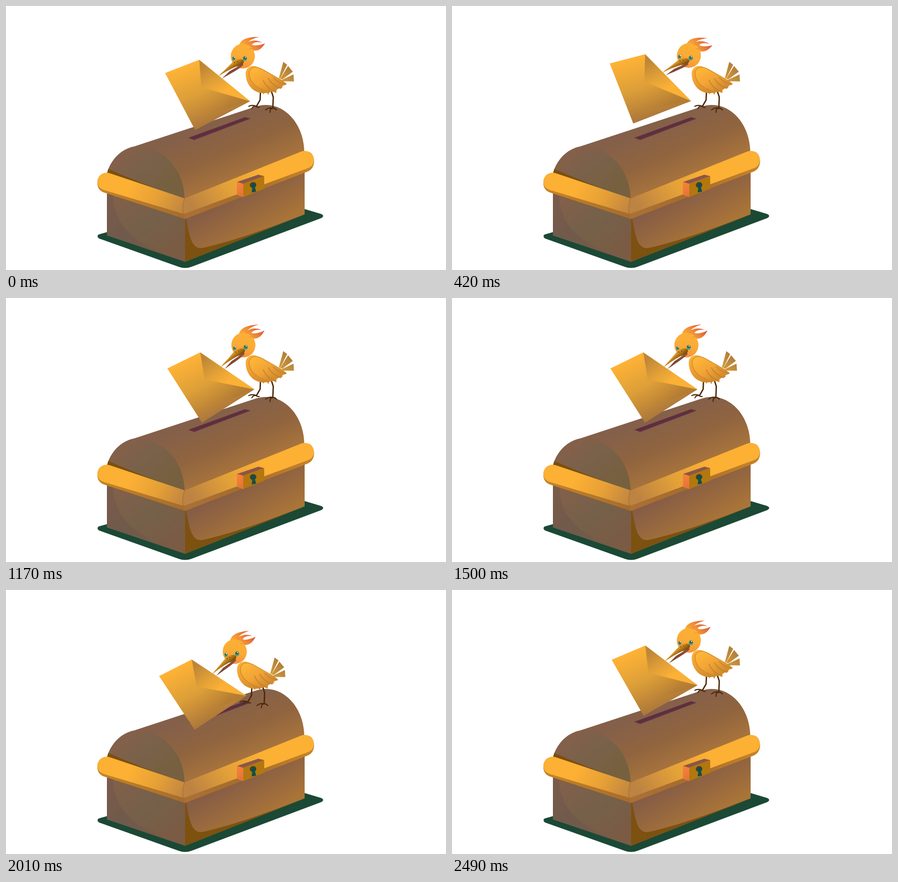
Animation, 968 px wide and 579 px high, one loop 3.3 s. Source, as an HTML page with a canvas:

```html
<!DOCTYPE html>
<html lang="en">
<head>
<meta charset="utf-8">
<title>Bird with a letter</title>
<style>
html, body { margin: 0; width: 100%; height: 100%; overflow: hidden; background: #fff; }
canvas { display: block; }
</style>
</head>
<body>
<canvas id="stage" width="968" height="579"></canvas>
<script>
const ctx = document.getElementById('stage').getContext('2d');
const LOOP = 3300, STEP = 30;
const NECK = [535, 111];

// [time, value] keys
const tilt = [[240, 0], [450, 6.8], [660, -4.8], [1800, -4.8], [1895, 6.4],
  [2010, -5.7], [2085, 6.4], [2160, -1.9]];
const moveX = [[1410, 0], [1500, -6.5], [1740, -19], [2310, -19], [2490, 0]];
const moveY = [[1140, 0], [1170, -6], [1200, -21], [1260, -21], [1290, 0], [1410, 0],
  [1500, -6], [1590, -28], [1740, 25.5], [2310, 25.5], [2430, -23], [2490, 0]];
const headLift = [[1140, 0], [1170, 1], [2310, 1], [2490, 0]];

function track(keys, t, ease = true) {
  if (t <= keys[0][0]) return keys[0][1];
  for (let i = 1; i < keys.length; i++) {
    const [t0, v0] = keys[i - 1], [t1, v1] = keys[i];
    if (t <= t1) {
      const p = (t - t0) / (t1 - t0);
      return v0 + (v1 - v0) * (ease ? p * p * (3 - 2 * p) : p);
    }
  }
  return keys[keys.length - 1][1];
}

function grad(x0, y0, x1, y1, ...colors) {
  const g = ctx.createLinearGradient(x0, y0, x1, y1);
  colors.forEach((c, i) => g.addColorStop(i / (colors.length - 1), c));
  return g;
}

function fill(d, style) {
  ctx.fillStyle = style;
  ctx.fill(new Path2D(d));
}

function line(d, color, width) {
  ctx.strokeStyle = color;
  ctx.lineWidth = width;
  ctx.lineCap = ctx.lineJoin = 'round';
  ctx.stroke(new Path2D(d));
}

function oval(x, y, rx, ry, style, turn = 0) {
  ctx.fillStyle = style;
  ctx.beginPath();
  ctx.ellipse(x, y, rx, ry, turn, 0, Math.PI * 2);
  ctx.fill();
}

function drawBase() {
  fill('M222 496L204 501Q198 505 205 510L380 572Q394 577 408 572L694 465Q702 460 693 456L656 445Z', '#1b4935');
  fill('M222 398V503L394 561V450Z', grad(240, 420, 345, 560, '#83604a', '#75604a', '#7b5b43'));
  fill('M222 398V503L394 561C300 525 236 500 235 404Z', grad(222, 420, 340, 545, '#7a5b4b', '#705a4b', '#765a48'));
  fill('M394 455L657 355V457L394 561Z', grad(480, 425, 530, 515, '#855c46', '#a97438'));
  fill('M394 455V561L657 457C590 482 500 517 430 531C404 533 402 490 394 455Z', '#7d510f');
}

function drawLid() {
  fill('M222 368C230 338 252 314 282 308L548 221C603 202 657 252 656.5 324L393 424Z',
    grad(440, 262, 495, 392, '#84604a', '#90643f', '#aa753c'));
  fill('M222 368C230 338 252 314 282 309C335 303 392 350 393 424Z',
    grad(255, 320, 330, 415, '#85604a', '#79614a', '#77603f'));
  fill('M225 357Q264 375 345 406L222 368Z', '#7b500f');
}

function drawTrim() {
  fill('M227 367C211 363 201 374 201 388C201 399 207 406 216 409L394 467L664 362C681 357 682 327 667 320L393 422Z', '#a96c2b');
  fill('M229 367C213 362 201 373 201 386C201 396 207 401 216 404L391 456L393 422Z',
    grad(280, 383, 394, 444, '#fcb034', '#e6a036', '#bf8541'));
  fill('M216 404L390 456L394 467L216 409C208 406 203 401 202 393C205 399 210 402 216 404Z',
    grad(210, 404, 394, 462, '#c68524', '#a66b2c'));
  fill('M393 422L650 319C665 314 677 324 677.5 337C677 347 673 353 664 356L392 456Q388 438 393 422Z',
    grad(558, 356, 420, 452, '#fcb034', '#e2a038', '#bd8342'));
  fill('M392 456L664 356C673 353 677 347 677.5 338C678 351 673 359 664 363L394 467Z',
    grad(394, 462, 675, 350, '#aa7035', '#a66c2a', '#c88528'));
  line('M393 422C387 437 388 456 394 466', '#a7712d', 1.3);
}

function drawSlotAndLock() {
  fill('M401 289L526 244L538 247L414 294Z', '#5c2f40');
  line('M402 289L526 244L537 247L414 293Z', '#753c42', 1);
  fill('M508 386L555 370L568 373L522 390Z', '#8c5646');
  fill('M508 386L522 390V419L508 414Z', grad(508, 390, 522, 412, '#f58238', '#e77438'));
  fill('M522 390L568 373V401L522 419Z', '#b2770f');
  oval(543.5, 392.5, 7.2, 6.3, '#4c421c', -0.2);
  oval(544.5, 393.5, 5.8, 5, '#124e49', -0.2);
  fill('M542 396L540.5 409L550.5 407L547 396Z', '#124e49');
}

function drawLegs() {
  const brown = '#4b2a0b';
  line('M560 184L559 206L551 220', brown, 3);
  line('M582 181L588 200L587 224', brown, 3);
  line('M551 220Q542 216 534 220M551 220Q543 219 541 225M550 219Q552 223 557 222', brown, 2.3);
  line('M587 224Q578 222 571 228M587 224Q580 225 581 233M587 224Q592 224 595 228', brown, 2.3);
}

function drawBody() {
  const tail = grad(602, 160, 630, 132, '#d39a3b', '#a9793a');
  fill('M600 159L610 122.5L618.5 129L604 158Z', tail);
  fill('M603 160L620.5 131.5L631 144L608 161Z', tail);
  fill('M602 165L611 160L632.5 150L633.5 165.5Z', tail);
  fill('M527.5 145C530 133 542 128 554 134C573 143 590 155 617 171L604 178C592 188 576 192 562 191C540 188 526 168 527.5 145Z',
    grad(550, 130, 562, 194, '#fbb136', '#f0a033', '#cf882c'));
  fill('M560 178L566 194L572 186L577 195L581 185L595 191L594 176Z', '#cf8a2a');
  fill('M535 142C540 130 554 132 566 140C585 151 600 158 617 171Q613 176 605 171Q612 179 604 181Q595 180 589 174Q600 188 592 187C582 187 577 180 572 176Q582 188 574 186C552 183 531 166 535 142Z',
    grad(550, 138, 585, 188, '#fdb438', '#f2a435', '#d38b2f'));
  line('M535 142C532 163 548 180 574 186', '#d08b2c', 1.6);
  line('M566 163Q572 179 591 187M577 159Q586 174 604 181M588 157Q598 168 616 172', '#c0812d', 1.7);
  line('M536 142C541 131 554 133 566 140C585 151 600 158 616 170', '#d28e2f', 1.5);
}

function drawEye(x, y, rx, ry) {
  oval(x, y, rx, ry, '#e3a646');
  oval(x, y + 0.5, rx - 0.8, ry - 0.8, grad(x, y - 4, x, y + 5, '#167360', '#35b093'));
  oval(x + 0.4, y - 1, rx * 0.46, ry * 0.46, '#4b4a2b');
  oval(x + 1.2, y - 2.2, 1.2, 1.3, '#fff');
}

function drawHead() {
  fill('M512 92C513 74 528 67 558 68C546 70 538 74 533 79C543 74 553 75 563 80C552 78 544 80 541 85C548 88 560 86 570 82C563 93 556 99 545 98L530 102Z',
    grad(524, 96, 556, 70, '#fbac36', '#f08c38', '#dc5a38'));
  oval(521, 110, 26.5, 27, grad(528, 84, 513, 138, '#fbb035', '#fbab36', '#f58f3b'));
  line('M529 86Q534 79 546 76M535 94Q544 94 553 90', '#e98537', 1);
  drawEye(501, 115, 4, 5);
  drawEye(525.5, 115, 5.3, 5.8);
  fill('M475 159L492 143C504 136 512 132 521 126L522 130C512 139 496 147 475 159Z',
    grad(480, 154, 521, 130, '#7c432e', '#8f5240'));
  fill('M466 155L498 124C506 117 519 114 523 120C525 128 514 131 506 133C492 139 478 147 466 155Z',
    grad(494, 125, 504, 138, '#dc971f', '#b57617', '#7d4d0d'));
  line('M472 149C486 137 497 127 511 120', '#e9ab36', 1);
  oval(503, 124, 1.4, 1, '#61400d', -0.6);
  oval(509, 122, 1.4, 1, '#61400d', -0.6);
}

function drawLetter() {
  fill('M350 147L425 118L537 209L416 272Z', grad(390, 134, 440, 258, '#feb236', '#dd9f38', '#ae793a'));
  fill('M430 178L537 209L425 243L395 228Z', grad(425, 180, 488, 224, 'rgba(235,164,50,0)', 'rgba(165,108,32,.25)'));
  fill('M425 118L537 209L430 178Z', grad(432, 132, 470, 192, '#bd8637', '#dd9d37', '#fbb036'));
}

function draw(t) {
  ctx.fillStyle = '#fff';
  ctx.fillRect(0, 0, 968, 579);
  drawBase();
  drawLid();
  drawTrim();
  drawSlotAndLock();

  const lift = track(headLift, t);
  ctx.save();
  ctx.translate(track(moveX, t, false), track(moveY, t));
  drawLegs();
  drawBody();
  ctx.translate(1.3 * lift, -1.9 * lift);
  ctx.translate(...NECK);
  ctx.rotate(track(tilt, t) * Math.PI / 180);
  ctx.translate(-NECK[0], -NECK[1]);
  drawHead();
  drawLetter();
  ctx.restore();
}

const start = performance.now();
function tick() {
  const t = (performance.now() - start) % LOOP;
  draw(Math.floor(t / STEP) * STEP);
  requestAnimationFrame(tick);
}
tick();
</script>
</body>
</html>
```
